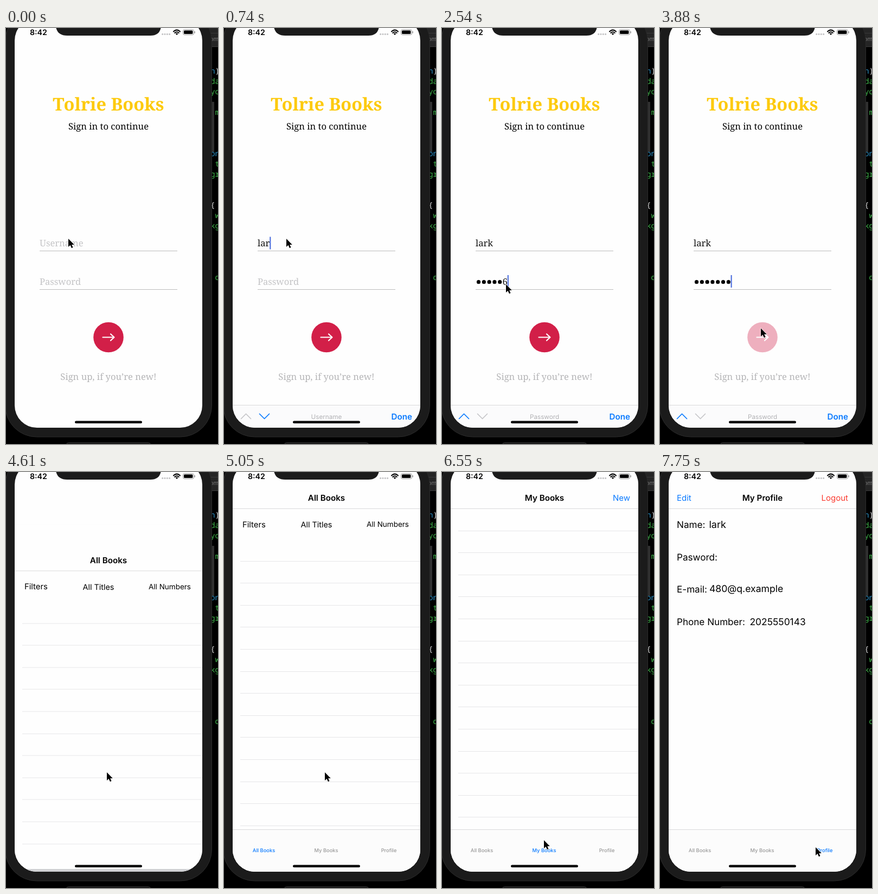
Write an HTML page that moves like this. It is 391 px wide and 766 px high and loops after 8000 ms.

```html
<!DOCTYPE html>
<html lang="en">
<head>
<meta charset="utf-8">
<title>Book app sign-in</title>
<style>
  html, body { margin: 0; width: 100%; height: 100%; overflow: hidden; background: #000; }
  svg { display: block; width: 391px; height: 766px; }
  text { font-family: Inter, Roboto, sans-serif; white-space: pre; text-rendering: geometricPrecision; }
  .slab { font-family: "Noto Serif", serif; font-weight: 300; font-size: 16.6px; }
  .title { font-family: "Noto Serif", serif; font-weight: 700; font-size: 32.5px; fill: #fdca0d; }
  .code { font-family: "Noto Sans Mono", monospace; font-size: 14.3px; }
  .nav { font-weight: 600; font-size: 15.2px; }
  .action { font-size: 15px; }
  .tab { font-weight: 500; font-size: 9.3px; fill: #999; }
  .profile { font-size: 17.1px; }
  .mid { text-anchor: middle; }
  .end { text-anchor: end; }
  .hint { fill: #c4c4c6; }
  .blue { fill: #0a7aff; }
  .rule { stroke: #e6e6e8; }
  .edge { stroke: #d9d9db; }
  .line { fill: none; stroke-linecap: round; stroke-linejoin: round; }
</style>
</head>
<body>
<svg viewBox="0 0 391 766">
  <defs>
    <clipPath id="screen"><rect x="16" y="-18" width="346" height="754" rx="41"/></clipPath>
  </defs>

  <rect width="391" height="766"/>
  <rect x="370" width="21" height="34" fill="#252525"/>
  <path d="M370 9.5H391M370 34.5H391" stroke="#3a3a3a"/>
  <text x="376" y="24" font-size="11" fill="#777">om</text>
  <g id="code"></g>
  <rect x="376" y="136" width="8" height="92" fill="#303030"/>
  <rect x="111.5" y="763.5" width="155" height="20" rx="4" fill="#161616" stroke="#333"/>
  <rect x="-1.5" y="-34" width="381" height="787" rx="58" fill="#1b1b1b" stroke="#2b2b2b"/>

  <g clip-path="url(#screen)">
    <rect x="16" y="-18" width="346" height="754" fill="#fefefe"/>
    <g id="login">
      <text class="title mid" x="189" y="152">Tolrie Books</text>
      <text class="slab mid" x="189" y="187">Sign in to continue</text>
      <path d="M62 410.5H316M62 481.5H316" stroke="#bcbcbc"/>
      <text id="userHint" class="slab hint" x="62" y="402">Username</text>
      <text id="user" class="slab" x="62" y="402" fill="#111"></text>
      <text id="passHint" class="slab hint" x="62" y="473">Password</text>
      <g id="dots"></g>
      <text id="lastChar" class="slab" y="473" fill="#111"></text>
      <rect id="caret" width="2" height="23" fill="#4468dc"/>
      <g id="button">
        <circle cx="189" cy="569.5" r="27.8" fill="#d21f48"/>
        <path class="line" d="M178.500 569.500H199M193 563.500L199.500 569.500L193 575.500" stroke="#fff" stroke-width="2.2"/>
      </g>
      <text class="slab mid" x="189" y="648" fill="#b5b5b7">Sign up, if you’re new!</text>
    </g>

    <g id="app">
      <rect x="16" y="-18" width="346" height="860" fill="#fefefe"/>
      <g id="allBooks">
        <text class="nav mid" x="189" y="53">All Books</text>
        <text x="34" y="101.500" font-size="14.8">Filters</text>
        <text class="mid" x="170.500" y="102" font-size="14.4">All Titles</text>
        <text class="end" x="341" y="101" font-size="13.5">All Numbers</text>
        <g id="allRows"></g>
      </g>
      <g id="myBooks">
        <text class="nav mid" x="189" y="53">My Books</text>
        <text class="action end blue" x="347" y="53">New</text>
        <g id="myRows"></g>
      </g>
      <g id="profile">
        <text class="action blue" x="31" y="53">Edit</text>
        <text class="nav mid" x="189" y="53">My Profile</text>
        <text class="action end" x="347" y="53" fill="#fb3b30">Logout</text>
        <g class="profile">
          <text x="31" y="103">Name:</text><text x="90.500" y="102.500" font-size="18">lark</text>
          <text x="31" y="163">Pasword:</text>
          <text x="31" y="222">E-mail:</text><text x="91" y="221" font-size="17.6">480@q.example</text>
          <text x="31" y="282">Phone Number:</text><text x="165.500" y="281.500" font-size="17.4">2025550143</text>
        </g>
      </g>
      <rect x="16" y="658" width="346" height="190" fill="#fcfcfc"/>
      <path class="edge" d="M16 67.500H362M16 658.500H362"/>
      <g id="tabs"></g>
    </g>

    <g id="accessory">
      <rect x="16" y="694" width="346" height="60" fill="#fbfbfc"/>
      <path class="edge" d="M16 694.500H362"/>
      <path id="prev" class="line" d="M31.500 719.500L40.500 710.500L49.500 719.500" stroke-width="1.7"/>
      <path id="next" class="line" d="M65.500 710.500L74.500 719.500L83.500 710.500" stroke-width="1.7"/>
      <text id="fieldName" class="mid" x="189" y="719.500" font-size="11.7" fill="#b2b2b5"></text>
      <text class="nav end blue" x="347" y="721">Done</text>
    </g>
    <rect id="strip" x="16" y="731" width="346" height="6" fill="#d0d1d4"/>
  </g>

  <path d="M92 -20V-2C94 9 101 14 113 14H266C278 14 284 9 286 -2V-20Z" fill="#1b1b1b"/>
  <text x="44" y="13" font-weight="600" font-size="14.2">8:42</text>
  <g id="signal" fill="#c5c5c7"></g>
  <path class="line" d="M309 6.500Q315 .8 321 6.500M311.300 9Q315 5.600 318.700 9" stroke="#000" stroke-width="2"/>
  <path d="M312.600 10.500Q315 8.500 317.400 10.500L315 13Z"/>
  <rect x="326.500" y="3" width="20" height="9.600" rx="2.800" fill="none" stroke="#999"/>
  <rect x="328" y="4.500" width="16.500" height="6.600" rx="1.500"/>
  <rect x="347.500" y="6" width="1.500" height="3.600" rx=".7" fill="#999"/>
  <rect x="127" y="723.500" width="124" height="4.600" rx="2.300"/>
  <path id="pointer" d="M0 0V15L3.500 11.800L6 17.200L8.500 16.100L6.200 10.900H10.800Z" stroke="#fff" stroke-width="1.100" paint-order="stroke"/>
</svg>

<script>
const LOOP = 8000;
const $ = id => document.getElementById(id);
const show = (id, on) => $(id).setAttribute("display", on ? "inline" : "none");
const attr = (id, values) => {
  for (const key in values) $(id).setAttribute(key, values[key]);
};
const shift = (id, x, y) => attr(id, { transform: `translate(${x} ${y})` });
const range = n => [...Array(n).keys()];

// Value of the latest [time, value] entry that has been reached.
const hold = (t, keys) => keys.reduce((value, key) => (t >= key[0] ? key[1] : value), keys[0][1]);

const GREEN = "#3fb24a", BLUE = "#2b8fc4", WHITE = "#ddd";
const CODE = [
  [84, "n", BLUE], [84, " )", WHITE], [103, "da", GREEN], [122, "yo", GREEN], [160, " m", GREEN],
  [236, "on", BLUE], [255, " t", GREEN], [274, "gr", GREEN], [331, "{", WHITE],
  [350, " w", GREEN], [369, "kg", GREEN], [464, " d", GREEN]
];
const TABS = [["All Books", 73.5], ["My Books", 188.5], ["Profile", 304]];
const ROW = 40.6, DOT = 9.8;

const POINTER = [
  [0, [115, 388]], [1340, [118, 472]],
  [3290, [128, 488]], [3440, [150, 515]], [3580, [175, 542]], [3730, [186, 553]],
  [5200, [188, 545]], [5350, [190, 530]], [5500, [192, 518]], [5650, [194, 608]],
  [5950, [192, 640]], [6100, [189, 668]], [6250, [188, 678]],
  [7000, [198, 682]], [7150, [222, 690]], [7300, [254, 695]], [7450, [280, 693]], [7600, [287, 691]]
];
const USER = [[0, ""], [590, "la"], [740, "lar"], [890, "lark"]];
const TYPED = [[0, 0], [1790, 2], [1940, 3], [2090, 4], [2390, 5], [2540, 6], [2840, 7]];
const SLIDE = [4460, 4610, 4760, 4900, 5050].map(t => [t, t < 5050 ? 114.5 * Math.exp((4610 - t) / 110) : 0]);
const BAR = [[0, 50], [300, 22], [440, 0], [4460, 20], [4610, 50]];

const rows = (first, count) => range(count)
  .map(i => `<path class="rule" d="M30 ${Math.floor(first + i * ROW) + 0.5}H362"/>`).join("");

$("code").innerHTML = CODE.map(([y, s, fill]) => `<text class="code" x="377" y="${y}" fill="${fill}">${s}</text>`).join("");
$("signal").innerHTML = range(4).map(i => `<circle cx="${288.7 + i * 4.3}" cy="11.400" r="1.600"/>`).join("");
$("dots").innerHTML = range(7).map(i => `<circle cx="${67.5 + i * DOT}" cy="467.700" r="3.600"/>`).join("");
$("allRows").innerHTML = rows(164, 13);
$("myRows").innerHTML = rows(108, 14);
$("tabs").innerHTML = TABS.map(([s, x]) => `<text class="tab mid" x="${x}" y="700">${s}</text>`).join("");

function drawLogin(t) {
  const user = hold(t, USER), typed = hold(t, TYPED);
  const onPassword = t >= 1490;
  const masked = t >= 3140 ? typed : Math.max(0, typed - 1);
  $("user").textContent = user;
  show("userHint", !user);
  show("passHint", !typed);
  [...$("dots").children].forEach((dot, i) => dot.setAttribute("display", i < masked ? "inline" : "none"));
  $("lastChar").textContent = masked < typed ? typed : "";
  attr("lastChar", { x: 62.5 + masked * DOT });

  const userEnd = user ? $("user").getComputedTextLength() : 0;
  show("caret", t >= 300);
  attr("caret", {
    x: onPassword ? 62 + typed * DOT : 62 + userEnd,
    y: onPassword ? 455 : 384.5
  });
  attr("button", { opacity: t >= 3880 && t < 4020 ? 0.35 : 1 });

  show("accessory", t >= 300 && t < 4610);
  shift("accessory", 0, hold(t, BAR));
  $("fieldName").textContent = onPassword ? "Password" : "Username";
  attr("prev", { stroke: onPassword ? "#0a7aff" : "#c6c6c9" });
  attr("next", { stroke: onPassword ? "#c6c6c9" : "#0a7aff" });
  show("strip", t >= 4610 && t < 4760);
}

function drawApp(t) {
  const page = hold(t, [[0, 0], [6550, 1], [7750, 2]]);
  const offset = hold(t, SLIDE);
  show("app", t >= 4460);
  shift("app", 0, offset);
  ["allBooks", "myBooks", "profile"].forEach((id, i) => show(id, i === page));
  [...$("allRows").children].forEach((row, i) =>
    row.setAttribute("display", 164 + i * ROW + offset < 720 ? "inline" : "none"));
  [...$("tabs").children].forEach((tab, i) => tab.style.fill = i === page ? "#0a7aff" : "#999");
}

function draw(t) {
  drawLogin(t);
  drawApp(t);
  shift("pointer", ...hold(t, POINTER));
}

const start = performance.now();
function tick(now) {
  draw(Math.max(0, now - start) % LOOP);
  requestAnimationFrame(tick);
}
draw(0);
requestAnimationFrame(tick);
</script>
</body>
</html>
```
